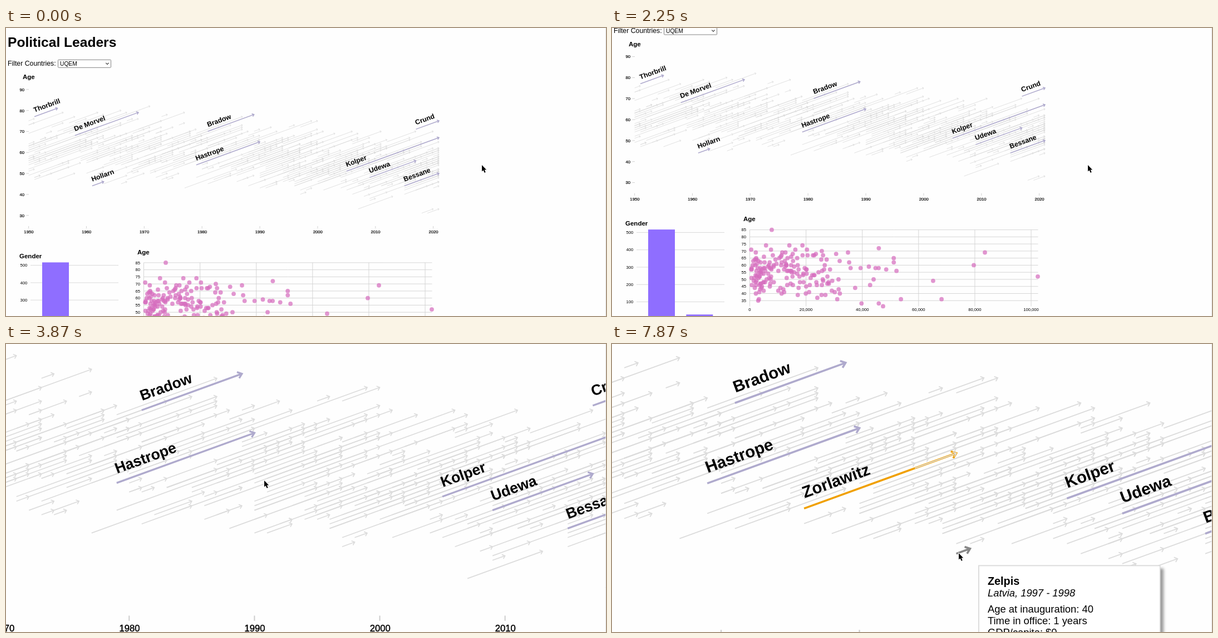
These frames come from a looping animation (1078 px wide and 519 px high, 8000 ms). An HTML page with a canvas:

```html
<!DOCTYPE html>
<html lang="en">
<head>
<meta charset="utf-8">
<title>Political Leaders</title>
<style>
  html, body { margin: 0; width: 100%; height: 100%; overflow: hidden; background: #fefefe; }
  canvas { display: block; }
</style>
</head>
<body>
<canvas id="stage" width="1078" height="519"></canvas>
<script>
const ctx = document.getElementById('stage').getContext('2d');
const LOOP = 8000;
const STEP = 146.5;
const FAMILY = '"Liberation Sans", Arial, sans-serif';
const SMALL = 7.68, TITLE = 11.52, BODY = 12.29;
const GREY = '#dcdcdc', LILAC = '#afaacd', HOVER = '#888', ORANGE = '#f0a000';

// A term is [start year, age at start, years in office].
const labelled = [
  ['Thorbrill', 1951, 77, 4], ['De Morvel', 1958, 68, 11], ['Hollarn', 1961, 44, 2],
  ['Bradow', 1981, 70, 8], ['Hastrope', 1979, 54, 11], ['Kolper', 2005, 51, 16],
  ['Udewa', 2009, 48, 8], ['Crund', 2017, 71, 4], ['Bessane', 2015, 44, 6]
];
const chosen = { name: 'Zorlawitz', term: [1986, 49, 11], place: 'Austria', gdp: 12886 };
const second = { name: 'Zelpis', term: [1997, 40, 1], place: 'Latvia', gdp: 0 };
const overlapping = [1994, 57, 3];

const yearX = year => 40.6 + (year - 1950) * 10.386;
const ageY = age => 110.5 + (90 - age) * 3.783;
const dotY = age => 422.9 + (85 - age) * 2.552;
const SLOPE = Math.atan2(-3.783, 10.386);
const clamp = (v, low, high) => Math.min(high, Math.max(low, v));

function seeded(seed) {
  return () => {
    seed = (seed + 0x6D2B79F5) | 0;
    let n = Math.imul(seed ^ (seed >>> 15), 1 | seed);
    n = (n + Math.imul(n ^ (n >>> 7), 61 | n)) ^ n;
    return ((n ^ (n >>> 14)) >>> 0) / 4294967296;
  };
}

const bell = rnd => rnd() + rnd() + rnd() - 1.5;

// Each country is a chain of terms up to 2021; leaders get younger after 1970.
function makeTerms() {
  const rnd = seeded(41), terms = [overlapping];
  const kept = [chosen.term, second.term].map(([year, age]) => year - age);
  for (let country = 0; country < 36; country++) {
    let year = country < 24 ? 1950 : 1990;
    while (year < 2021) {
      const years = Math.min(1 + Math.floor(10 * rnd() ** 1.8), 2021 - year);
      const mean = 60 - 10 * clamp((year - 1970) / 45, 0, 1);
      const age = Math.round(mean + 14 * bell(rnd));
      if (!kept.includes(year - age)) terms.push([year, age, years]);
      year += years;
    }
  }
  return terms;
}

// Incomes fall off exponentially, with a few far outliers.
function makeDots() {
  const rnd = seeded(7);
  const dots = [[287, 85], [487, 31], [650, 60], [670, 69], [765, 52]];
  while (dots.length < 200) {
    const x = 250 - 88 * Math.log(1 - rnd());
    const age = Math.round(53 + 18 * bell(rnd));
    if (x < 600 && age > 31) dots.push([x, age]);
  }
  return dots;
}

const terms = makeTerms(), dots = makeDots();

function text(str, x, y, size, style = '', align = 'left') {
  ctx.font = `${style} ${size}px ${FAMILY}`;
  ctx.textAlign = align;
  ctx.fillStyle = '#000';
  ctx.fillText(str, x, y);
}

function axisText(str, x, y, align) {
  text(str, x, y, SMALL, '', align);
  ctx.lineWidth = 0.2;
  ctx.strokeStyle = '#000';
  ctx.strokeText(str, x, y);
}

function line(x1, y1, x2, y2, color, width = 0.9) {
  ctx.strokeStyle = color;
  ctx.lineWidth = width;
  ctx.beginPath();
  ctx.moveTo(x1, y1);
  ctx.lineTo(x2, y2);
  ctx.stroke();
}

function alongTerm([year, age], paint) {
  ctx.save();
  ctx.translate(yearX(year), ageY(age));
  ctx.rotate(SLOPE);
  paint();
  ctx.restore();
}

function arrow(term, color, strong) {
  const length = term[2] * Math.hypot(10.386, 3.783);
  const back = strong ? 3.4 : 2.2, wing = strong ? 2.7 : 1.9;
  alongTerm(term, () => {
    ctx.strokeStyle = color;
    ctx.lineWidth = strong ? 1.54 : 0.77;
    ctx.beginPath();
    ctx.moveTo(0, 0);
    ctx.lineTo(length, 0);
    ctx.moveTo(length - back, -wing);
    ctx.lineTo(length, 0);
    ctx.lineTo(length - back, wing);
    ctx.stroke();
  });
}

function arrowLabel(name, term) {
  alongTerm(term, () => text(name, 3, -7.2, BODY, 'bold'));
}

function drawHeader() {
  text('Political Leaders', 3, 34, 24.58, 'bold');
  text('Filter Countries:', 3, 67.8, BODY);
  ctx.fillStyle = '#fff';
  ctx.strokeStyle = '#767676';
  ctx.lineWidth = 0.9;
  ctx.beginPath();
  ctx.roundRect(93.5, 57.3, 95, 14, 1);
  ctx.fill();
  ctx.stroke();
  text('UQEM', 97, 68, 10.24);
  line(179.3, 62.8, 182.2, 65.7, '#333', 1.1);
  line(181.8, 65.7, 184.7, 62.8, '#333', 1.1);
}

function drawTimeline(t) {
  text('Age', 30, 92.2, TITLE, 'bold');
  for (let age = 30; age <= 90; age += 10) {
    axisText(age, 33, ageY(age) + 3.2, 'right');
    line(36.5, ageY(age) + 0.3, 41, ageY(age) + 0.3, '#ccc');
  }
  for (let year = 1950; year <= 2020; year += 10) {
    line(yearX(year), 357, yearX(year), 361.3, '#ccc');
    axisText(year, yearX(year) + 0.3, 370, 'center');
  }

  // Marked lines lie below the thin ones, which run on top of them.
  const picked = t >= 5650, over = t >= 4310, overSecond = t >= 7720;
  arrow(chosen.term, picked ? ORANGE : over ? HOVER : GREY, over);
  arrow(second.term, overSecond ? HOVER : GREY, overSecond);
  terms.forEach(term => arrow(term, GREY, false));
  labelled.forEach(([name, ...term]) => {
    arrow(term, LILAC, true);
    arrowLabel(name, term);
  });
  if (picked) arrowLabel(chosen.name, chosen.term);
}

function drawBars() {
  const valueY = v => 584 - v * 0.3126;
  text('Gender', 24, 415, TITLE, 'bold');
  for (let v = 0; v <= 500; v += 100) {
    line(44, valueY(v), 202, valueY(v), '#d6d6d6');
    text(v, 38.3, valueY(v) + 2.7, SMALL, '', 'right');
  }
  [['Male', 65, 517], ['Female', 133.3, 27]].forEach(([name, x, v]) => {
    ctx.fillStyle = '#8f6eff';
    ctx.fillRect(x, valueY(v), 48, 584 - valueY(v));
    text(name, x + 24, 596.5, 9.22, '', 'center');
  });
}

function drawScatter() {
  text('Age', 236, 407.5, TITLE, 'bold');
  for (let age = 35; age <= 85; age += 5) {
    line(247.5, dotY(age), 765.5, dotY(age), '#d2d2d2');
    text(age, 241, dotY(age) + 2.7, SMALL, '', 'right');
  }
  for (let k = 0; k <= 100; k += 20) {
    const x = 247.5 + k * 5.055;
    line(x, dotY(85), x, dotY(31), '#d2d2d2');
    text(k ? k + ',000' : '0', x, 569.3, SMALL, '', 'center');
  }
  text('GDP per Capita (US$)', 763, 588, TITLE, 'bold', 'right');
  ctx.fillStyle = 'rgba(214, 110, 190, 0.72)';
  dots.forEach(([x, age]) => {
    ctx.beginPath();
    ctx.arc(x, dotY(age), 3.9, 0, Math.PI * 2);
    ctx.fill();
  });
}

function drawTooltip({ name, term: [year, age, years], place, gdp }, x, y) {
  ctx.save();
  ctx.shadowColor = 'rgba(0, 0, 0, 0.4)';
  ctx.shadowBlur = 5;
  ctx.shadowOffsetX = ctx.shadowOffsetY = 5;
  ctx.fillStyle = '#dadada';
  ctx.fillRect(x - 1, y - 1, 327.5, 149);
  ctx.restore();
  ctx.fillStyle = '#fff';
  ctx.fillRect(x + 0.8, y + 0.8, 324, 145.4);
  text(name, x + 16, y + 34.5, 19.8, 'bold');
  text(`${place}, ${year} - ${year + years}`, x + 16, y + 55.8, 18.38, 'italic');
  [`Age at inauguration: ${age}`, `Time in office: ${years} years`, `GDP/capita: $${gdp}`]
    .forEach((row, i) => text(row, x + 16, y + 84 + i * 21.1, 18.38));
}

function drawCursor(x, y) {
  const outline = [[0, 0], [0, 11.6], [2.6, 9.2], [4.6, 13.8], [6.7, 12.9], [4.7, 8.4], [8.2, 8.4]];
  ctx.beginPath();
  outline.forEach(([dx, dy]) => ctx.lineTo(x + dx, y + dy));
  ctx.closePath();
  ctx.lineJoin = 'round';
  ctx.lineWidth = 1.8;
  ctx.strokeStyle = '#fff';
  ctx.stroke();
  ctx.fillStyle = '#000';
  ctx.fill();
  ctx.lineJoin = 'miter';
}

// Progress from 0 to 1 in hard steps, slowing down by the given power.
function easeOut(t, start, steps, power = 1) {
  if (t < start) return 0;
  const done = Math.min(steps, Math.floor((t - start) / STEP + 0.08) + 1);
  return 1 - (1 - done / steps) ** power;
}

const scrollAt = t => 102 * (easeOut(t, 900, 2) - easeOut(t, 2250, 3, 1.34));
const zoomAt = t => 2.393 ** easeOut(t, 3140, 8, 1.57);

const cursorMoves = [
  { start: 2550, steps: 3, to: [464, 246] },
  { start: 4310, steps: 1, to: [470, 249] },
  { start: 4610, steps: 2, to: [468, 251] },
  { start: 6100, steps: 10, to: [630, 371], power: [5, 2] },
  { start: 7720, steps: 2, to: [623, 377] }
];

function cursorAt(t) {
  return cursorMoves.reduce((from, { start, steps, to, power = [1, 1] }) =>
    from.map((v, i) => v + (to[i] - v) * easeOut(t, start, steps, power[i])), [855, 247]);
}

function draw(t) {
  const zoom = zoomAt(t);
  const [cx, cy] = cursorAt(t);

  ctx.setTransform(1, 0, 0, 1, 0, 0);
  ctx.fillStyle = '#fefefe';
  ctx.fillRect(0, 0, 1078, 519);

  ctx.setTransform(zoom, 0, 0, zoom, 464.3 * (1 - zoom), 243.5 * (1 - zoom) - scrollAt(t));
  drawHeader();
  drawTimeline(t);
  drawBars();
  drawScatter();

  ctx.setTransform(1, 0, 0, 1, 0, 0);
  line(1077.5, 0, 1077.5, 519, '#e6e6e6', 1);
  if (t >= 4310 && t < 6100) drawTooltip(chosen, cx + 29, cy + 28.5);
  if (t >= 7720) drawTooltip(second, 659, 399.5);
  drawCursor(cx, cy);
}

function loop() {
  draw(performance.now() % LOOP);
  requestAnimationFrame(loop);
}
loop();
</script>
</body>
</html>
```
